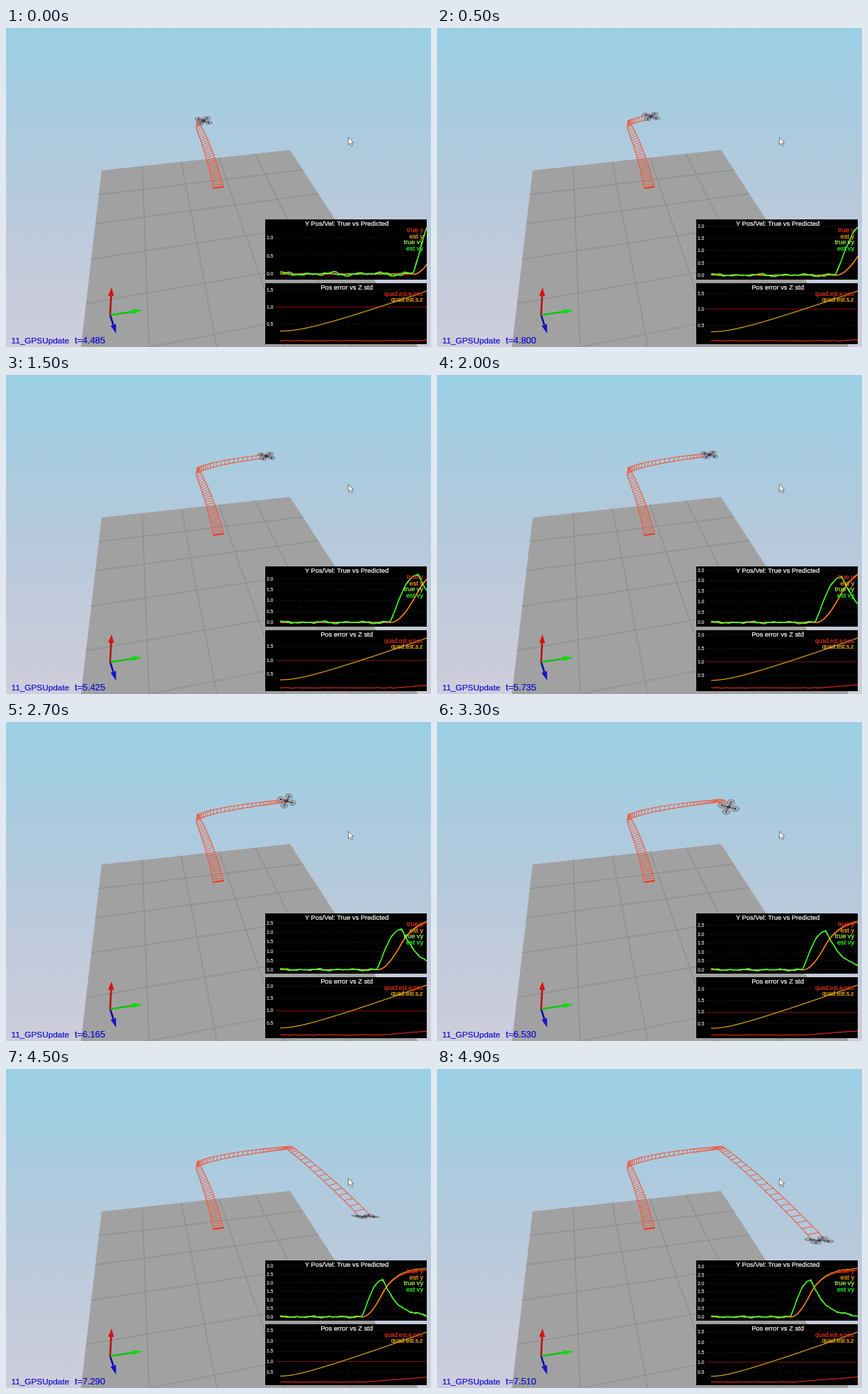
Animation of 600x450 px, one loop 5000 ms. Source, as an HTML page with a canvas:

```html
<!DOCTYPE html>
<html lang="en">
<head>
<meta charset="utf-8">
<title>Quadrotor estimator</title>
<style>
html, body { margin: 0; width: 100%; height: 100%; overflow: hidden; }
body { position: relative; }
canvas, svg { position: absolute; left: 0; top: 0; width: 600px; height: 450px; }
text {
  font-family: "Liberation Sans", Arial, sans-serif;
  fill: currentColor; stroke: currentColor; stroke-width: .22px;
}
.title { font-size: 9.35px; color: #fff; text-anchor: middle; }
.key { font-size: 9.2px; text-anchor: end; }
.small { font-size: 8.3px; }
.tick { font-size: 6.7px; color: #d8d8d8; }
.status { color: #100cd2; }
</style>
</head>
<body>
<canvas id="view" width="600" height="450"></canvas>
<svg id="labels" viewBox="0 0 600 450">
  <text class="status" x="7.5" y="444.6" font-size="11.8">11_GPSUpdate</text>
  <text class="status" id="clock" x="97" y="444.6" font-size="12.8"></text>
  <text class="title" x="481" y="278.8">Y Pos/Vel: True vs Predicted</text>
  <text class="title" x="481" y="368.9">Pos error vs Z std</text>
  <text class="key" x="589" y="288" color="#f03418">true y</text>
  <text class="key" x="589" y="296.7" color="#ffa614">est y</text>
  <text class="key" x="589" y="305.2" color="#a4ff58">true vy</text>
  <text class="key" x="589" y="314" color="#2cff20">est vy</text>
  <text class="key small" x="588.5" y="377.6" color="#e62e18">quad.est.e.pos</text>
  <text class="key small" x="588.5" y="386.4" color="#ffb414">quad.est.s.z</text>
</svg>
<script>
const ctx = document.getElementById("view").getContext("2d");
const svg = document.getElementById("labels");
const clock = document.getElementById("clock");
const LOOP = 5000, STEP = 100;
const MOVE = 4.08, PEAK = 5.11, DIVE = 6.22;

// Linear interpolation through [t, value] pairs
function through(keys, t) {
  let i = 0;
  while (i < keys.length - 2 && t > keys[i + 1][0]) i++;
  const [a, va] = keys[i], [b, vb] = keys[i + 1];
  return va + (vb - va) * (t - a) / (b - a);
}

const simTime = ms => through([[0, 4.485], [1000, 5.115], [2000, 5.735], [2700, 6.165],
  [3800, 6.835], [4500, 7.29], [4900, 7.51]], ms);
const tilt = t => through([[4.485, .5], [5.735, .45], [6.165, .78], [6.835, .62],
  [7.29, .13], [7.51, .24]], t);

// Sideways step: sine rise in speed, exponential decay
const TOP_SPEED = 2.22, DECAY = 1.45, RISE = PEAK - MOVE;
function vel(t) {
  if (t < MOVE) return 0;
  if (t < PEAK) return TOP_SPEED * Math.sin(Math.PI / 2 * (t - MOVE) / RISE);
  return TOP_SPEED * Math.exp(-DECAY * (t - PEAK));
}
function pos(t) {
  if (t < MOVE) return 0;
  const k = 2 * RISE / Math.PI;
  if (t < PEAK) return TOP_SPEED * k * (1 - Math.cos((t - MOVE) / k));
  return TOP_SPEED * (k + (1 - Math.exp(-DECAY * (t - PEAK))) / DECAY);
}

const noise = (t, p) => .03 * Math.sin(t * 8.3 + p) + .025 * Math.sin(t * 4.7 + 1.3 * p) +
  .018 * Math.sin(t * 23 + 2 * p);
const drift = t => .01 + .075 * Math.max(0, t - 4.2);
const estY = t => .98 * pos(t) + .25 * noise(t, 2);
const trueY = t => .98 * pos(t) - .45 * drift(t);
const trueVy = t => vel(t) + noise(t, .4);
const estVy = t => vel(t) + .9 * noise(t, 1.1);
const posErr = t => drift(t) + Math.abs(.25 * noise(t, 3));
const zStd = t => Math.hypot(.3, (.307 + .0031 * t) * t);

function bezier(s, a, b, c) {
  const r = 1 - s;
  return [0, 1].map(k => r * r * a[k] + 2 * r * s * b[k] + s * s * c[k]);
}

// Flight path: climb, sideways step, dive. Gives centre and half a rung.
const FOOT = [299.5, 224.5], TURN = [269.3, 134.5], CORNER = [400, 111], END = [540, 242];
function flight(t) {
  if (t < MOVE) {
    const s = Math.max(0, (t - 2.5) / (MOVE - 2.5));
    return [...bezier(s, FOOT, [289, 175], TURN), 1 + 6.3 * Math.sqrt(1 - s), -1 - 2.5 * s * s];
  }
  if (t < DIVE) {
    const s = Math.min(1, 1.02 * (1 - (1 - pos(t) / 3) ** 1.5));
    return [...bezier(s, TURN, [300, 121], CORNER), .5 + 3 * s ** 8, -3.8 + 1.6 * s];
  }
  const d = t - DIVE, s = .96 * (d < .5 ? d * d : d - .25);
  return [...bezier(s, CORNER, [462, 158], END), 4 + 4 * s, -1.5];
}

// Ground plane
function ground(u, v) {
  const w = 1 + .02 * u - .084 * v;
  return [(135 + 61.2 * u - 15 * v) / w, (201 - 2.36 * u + 14.3 * v) / w];
}

function path(points, close) {
  ctx.beginPath();
  points.forEach(p => ctx.lineTo(p[0], p[1]));
  if (close) ctx.closePath();
}
function stroke(points, color, width) {
  path(points);
  ctx.strokeStyle = color;
  ctx.lineWidth = width;
  ctx.stroke();
}
function fill(points, color) {
  path(points, true);
  ctx.fillStyle = color;
  ctx.fill();
}

function drawScene() {
  const sky = ctx.createLinearGradient(0, 0, 0, 450);
  sky.addColorStop(0, "#9acfe4");
  sky.addColorStop(.5, "#b5c9dc");
  sky.addColorStop(1, "#cfcddb");
  ctx.fillStyle = sky;
  ctx.fillRect(0, 0, 600, 450);

  const far = 7;
  fill([ground(0, 0), ground(5, 0), ground(5, far), ground(0, far)], "#a2a1a2");
  for (let i = 1; i <= 5; i++) {
    if (i < 5) stroke([ground(i, 0), ground(i, far)], "#919091", 1.5);
    stroke([ground(0, i), ground(5, i)], "#919091", 1.5);
  }
}

function drawArrow(dx, dy, head, half, color, dark) {
  const x = 147, y = 405, len = Math.hypot(dx, dy), ux = dx / len, uy = dy / len;
  const bx = x + dx - ux * head, by = y + dy - uy * head;
  stroke([[x, y], [bx, by]], dark, 2.6);
  fill([[x + dx, y + dy], [bx - uy * half, by + ux * half], [bx + uy * half, by - ux * half]], color);
}

function drawTrail(t) {
  const left = [], right = [], color = "#ee5a3e";
  const rung = s => {
    const [x, y, hx, hy] = flight(s);
    left.push([x - hx, y - hy]);
    right.push([x + hx, y + hy]);
    stroke([left[left.length - 1], right[right.length - 1]], color, 1);
  };
  for (let s = 2.5; s < t; s += .055) rung(s);
  rung(t);
  stroke(left, color, 1.1);
  stroke(right, color, 1.1);
  stroke([[292, 226], [307.5, 223.8]], "#e83c1e", 2.2);
}

function drawDrone(t) {
  const [x, y] = flight(t), k = tilt(t);
  const size = 8.8 + 5.2 * Math.max(0, t - DIVE) / 1.29;
  const rotor = .55 * size, flat = rotor * Math.max(k, .16);
  const yaw = .6 - .25 * Math.min(1, Math.max(0, (t - 5.7) / .5));
  const hubs = [0, 1, 2, 3].map(i => {
    const a = yaw + i * Math.PI / 2;
    return [x + size * Math.cos(a), y + size * k * Math.sin(a)];
  });
  hubs.forEach(h => {
    ctx.beginPath();
    ctx.ellipse(h[0], h[1], rotor, flat, .06, 0, 7);
    ctx.fillStyle = "rgba(158,158,166,.75)";
    ctx.fill();
    ctx.strokeStyle = "#6c6c75";
    ctx.lineWidth = .8;
    ctx.stroke();
  });
  [0, 1].forEach(i => stroke([hubs[i], hubs[i + 2]], "#55555e", 1.1));
  hubs.forEach((h, i) => {
    ctx.fillStyle = i % 2 ? "#2c3a86" : "#2b2b32";
    ctx.fillRect(h[0] - 1, h[1] - 1, 2, 2);
  });
  ctx.beginPath();
  ctx.ellipse(x, y, 2.8, Math.min(2.2, flat), 0, 0, 7);
  ctx.fillStyle = "#3c3c44";
  ctx.fill();
}

function drawCursor() {
  const arrow = [[0, 0], [0, 10.5], [2.4, 8.3], [4.2, 12], [6, 11.2], [4.3, 7.6], [7.4, 7.4]]
    .map(p => [p[0] + 483.3, p[1] + 154.3]);
  fill(arrow, "#fff");
  path(arrow, true);
  ctx.strokeStyle = "#555";
  ctx.lineWidth = .8;
  ctx.stroke();
}

function makeTicks() {
  return Array.from({ length: 7 }, () => {
    const el = document.createElementNS("http://www.w3.org/2000/svg", "text");
    el.setAttribute("class", "tick");
    el.setAttribute("x", 368);
    return svg.appendChild(el);
  });
}

const plots = [
  { top: 270, height: 85, base: 352, min: -.1, first: 0, limit: 275, ticks: makeTicks(),
    curves: [[trueY, "#f03418"], [estY, "#f89a14"], [trueVy, "#a0ff50"], [estVy, "#2cf820"]] },
  { top: 360, height: 86, base: 442, min: 0, first: 1, limit: 362.5, ticks: makeTicks(),
    curves: [[posErr, "#d42816"], [zStd, "#d89e14"]] }
];

function drawPlot(plot, t) {
  ctx.fillStyle = "#000";
  ctx.fillRect(366, plot.top, 228, plot.height);
  const lines = plot.curves.map(([f]) =>
    Array.from({ length: 161 }, (_, i) => f(t * i / 160)));
  const max = Math.max(...lines.flat());
  const yOf = v => plot.base - (v - plot.min) / (max - plot.min) * 71;
  const level = (y, color) => stroke([[381, Math.floor(y) + .5], [594, Math.floor(y) + .5]], color, 1);

  ctx.setLineDash([1, 2]);
  plot.ticks.forEach((el, i) => {
    const v = (i + plot.first) / 2, y = yOf(v), shown = y > plot.limit;
    el.textContent = shown ? v.toFixed(1) : "";
    el.setAttribute("y", y + 2.4);
    if (shown) level(y, "#262626");
  });
  ctx.setLineDash([]);
  ctx.save();
  ctx.beginPath();
  ctx.rect(366, plot.top, 228, plot.height);
  ctx.clip();
  if (plot.first) level(yOf(1), "#78120e");
  lines.forEach((line, k) =>
    stroke(line.map((v, i) => [387 + 207 * i / 160, yOf(v)]), plot.curves[k][1], 1.25));
  ctx.restore();
}

function draw(ms) {
  const t = Math.round(simTime(ms) * 200) / 200;
  drawScene();
  drawTrail(t);
  drawDrone(t);
  drawArrow(8.5, 26, 13, 4, "#1414c8", "#0e0e9c");
  drawArrow(46, -7, 15, 3.6, "#0cdc0c", "#0cc80c");
  drawArrow(2, -39, 12, 4.2, "#d8140c", "#b41410");
  drawCursor();
  plots.forEach(p => drawPlot(p, t));
  clock.textContent = "t=" + t.toFixed(3);
}

const start = performance.now();
let last = -1;
function tick() {
  const ms = Math.floor((performance.now() - start) % LOOP / STEP) * STEP;
  if (ms !== last) draw(last = ms);
  requestAnimationFrame(tick);
}
tick();
</script>
</body>
</html>
```
